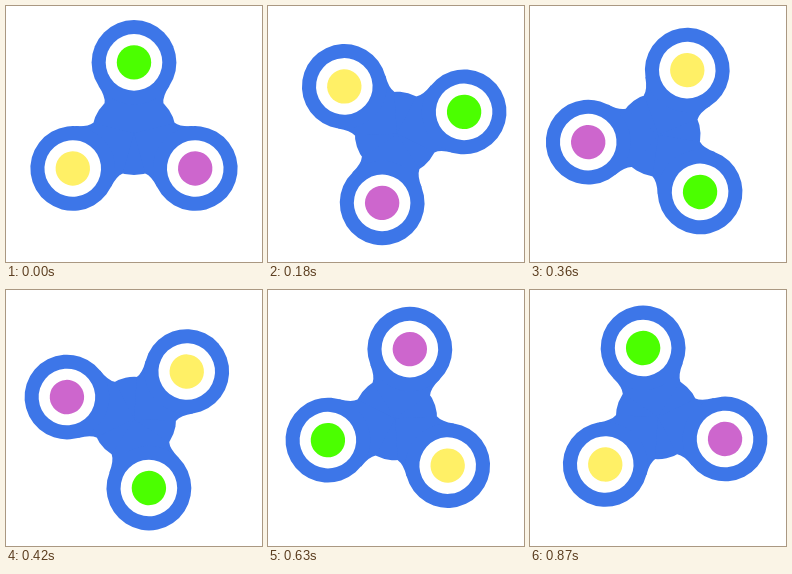
These frames come from a looping animation (256 px wide and 256 px high, 0.9 s). An HTML page with a canvas:

```html
<!DOCTYPE html>
<html lang="en">
<head>
<meta charset="utf-8">
<title>Spinner</title>
<style>
  html, body { margin: 0; width: 100%; height: 100%; overflow: hidden; background: #fff; }
  canvas { display: block; width: 256px; height: 256px; }
</style>
</head>
<body>
<canvas id="stage" width="256" height="256"></canvas>
<script>
const ctx = document.getElementById('stage').getContext('2d');
const BLUE = '#3d76e8';
const DOTS = ['#4bff00', '#cd66cd', '#fff066'];
const LOOP = 900, STEP = 30, STEPS = LOOP / STEP;
const TURN = Math.PI * 2;
const ARM = 70.7;       // hub centre to lobe centre
const OFFSET = 0.9;     // hub centre sits slightly off the pivot

function disc(x, y, r, color) {
  ctx.fillStyle = color;
  ctx.beginPath();
  ctx.arc(x, y, r, 0, TURN);
  ctx.fill();
}

// Concave sides joining a lobe to the hub
function neck() {
  ctx.fillStyle = BLUE;
  ctx.beginPath();
  ctx.moveTo(0, -ARM);
  ctx.lineTo(-35.4, -47.2);
  ctx.quadraticCurveTo(-28.5, -36.8, -29.4, -30);
  ctx.lineTo(0, 0);
  ctx.lineTo(29.4, -30);
  ctx.quadraticCurveTo(28.5, -36.8, 35.4, -47.2);
  ctx.fill();
}

function drawArm(color) {
  neck();
  disc(0, -ARM, 42.4, BLUE);
  disc(0, -ARM, 28.3, '#fff');
  disc(0, -ARM, 17.2, color);
}

function draw(time) {
  const step = Math.floor((time % LOOP) / STEP + 1e-6) % STEPS;
  ctx.fillStyle = '#fff';
  ctx.fillRect(0, 0, 256, 256);
  ctx.save();
  ctx.translate(128, 128);
  ctx.rotate(step / STEPS * TURN);
  ctx.translate(0, -OFFSET);
  disc(0, 0, 42, BLUE);
  for (const color of DOTS) {
    drawArm(color);
    ctx.rotate(TURN / 3);
  }
  ctx.restore();
}

const start = performance.now();
function tick() {
  draw(performance.now() - start);
  requestAnimationFrame(tick);
}
tick();
</script>
</body>
</html>
```
